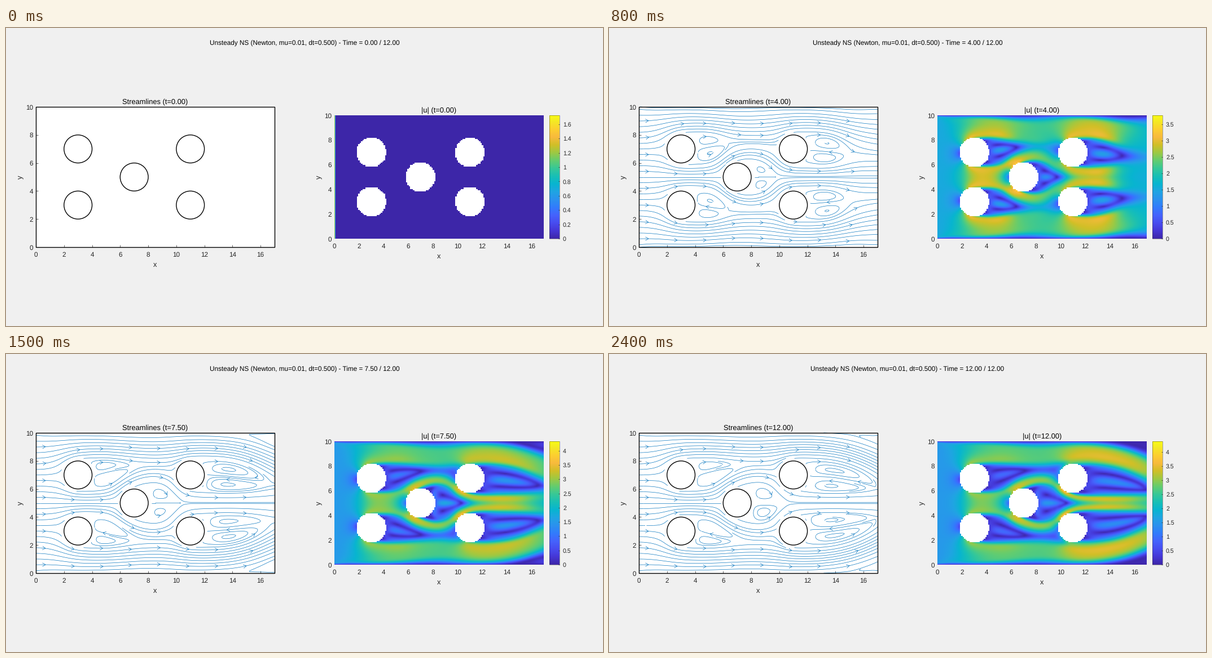
Write a matplotlib script that moves like this. It is 1058 px wide and 529 px high and loops after 2.5 s.

```python
import math
import numpy as np
import matplotlib.pyplot as plt
from matplotlib.animation import FuncAnimation
from matplotlib.collections import LineCollection
from matplotlib.patches import Circle, Rectangle

plt.rcParams["font.family"] = "Liberation Sans"
plt.rcParams["text.hinting"] = "none"

W, H, DPI = 1058, 529, 100
FRAMES, DT, NU, INFLOW = 25, 0.5, 0.01, 1.5
LX, LY = 17.0, 10.0
NX, M = 160, 50                      # solver cells in x and in the lower half of y
DX, DY = LX / NX, LY / (2 * M)
GX, GY = 149, 99                     # cells of the plotted grid
HOLES = [(3, 3), (3, 7), (7, 5), (11, 3), (11, 7)]

PARULA = np.array([
    (.2422, .1504, .6603), (.2706, .2147, .8364), (.2813, .3006, .9414),
    (.2699, .3892, .9906), (.1963, .4847, .9892), (.1687, .5703, .9359),
    (.1248, .6459, .8883), (.0297, .7082, .8163), (.0964, .7500, .7120),
    (.2161, .7843, .5923), (.3909, .8029, .4354), (.6174, .7876, .2612),
    (.8203, .7498, .1535), (.9728, .7298, .2394), (.9892, .8136, .1885),
    (.9597, .9135, .1423), (.9769, .9839, .0805)])
STOPS = np.append(np.arange(0, 61, 4), 63) / 63


def parula(s):
    return np.stack([np.interp(s, STOPS, PARULA[:, k]) for k in range(3)], -1)


# ---- flow solver: implicit Euler, Newton on the stream function ----

def gap(x, y):
    """Distance to the nearest hole centre."""
    x, y = x[:, None], y[None, :]
    return np.min([np.hypot(x - a, y - b) for a, b in HOLES], axis=0)


def drag(x, y):
    return 1000 * np.clip((1 - gap(x, y)) / DY + 0.5, 0, 1) ** 3


xn, yn = np.arange(NX + 1) * DX, np.arange(M + 1) * DY
drag_u = drag(xn[1:], yn[:-1] + DY / 2)
drag_v = drag(xn[:-1] + DX / 2, yn[1:-1])


def faces(psi):
    return np.diff(psi, axis=1) / DY, -np.diff(psi, axis=0) / DX


def force(c, old, sides, speeds, k):
    """Momentum balance without pressure; sides and speeds go E, W, N, S."""
    e, w, n, s = sides
    ue, uw, vn, vs = speeds
    lap = (e - 2 * c + w) / DX ** 2 + (n - 2 * c + s) / DY ** 2
    adv = ((ue * (e - c) + uw * (c - w)) / (2 * DX)
           + (vn * (n - c) + vs * (c - s)) / (2 * DY))
    return (c - old) / DT + adv - NU * lap + k * c


def residual(psi, u0, v0):
    """Curl of the momentum balance at the free nodes."""
    u, v = faces(psi)
    ux = np.concatenate([u, u[-1:]])
    uy = np.concatenate([-u[:, :1], u, u[:, -1:]], axis=1)[1:]
    vx = np.concatenate([-v[:1], v, v[-1:]])
    vc = (vx[1:-1] + vx[2:]) / 2
    uc = (u[:, 1:] + u[:, :-1]) / 2

    c, e, w = u[1:], ux[2:], ux[:-2]
    fu = force(c, u0[1:], (e, w, uy[:, 2:], uy[:, :-2]),
               ((e + c) / 2, (w + c) / 2, vc[:, 1:], vc[:, :-1]), drag_u)
    c, n, s = v[:, 1:-1], v[:, 2:], v[:, :-2]
    fv = force(c, v0[:, 1:-1], (vx[2:, 1:-1], vx[:-2, 1:-1], n, s),
               (uc[1:], uc[:-1], (n + c) / 2, (s + c) / 2), drag_v)
    dv = np.concatenate([np.diff(fv, axis=0) / DX, -2 * fv[-1:] / DX])
    return dv - np.diff(fu, axis=1) / DY


MY = M - 1
NB, B = NX // 2, 2 * MY
blocks = np.zeros((NB, 3, B, B))
I, J = np.meshgrid(np.arange(NX), np.arange(MY), indexing="ij")


def jacobian(psi, u0, v0):
    """Probe the 5x5 stencil; central differences are exact here."""
    for a in range(5):
        for b in range(5):
            e = np.zeros_like(psi)
            e[1:, 1:-1][a::5, b::5] = 1
            d = (residual(psi + e, u0, v0) - residual(psi - e, u0, v0)) / 2
            p = I + (a - I + 2) % 5 - 2
            q = J + (b - J + 2) % 5 - 2
            ok = (p >= 0) & (p < NX) & (q >= 0) & (q < MY)
            i, j, p, q = I[ok], J[ok], p[ok], q[ok]
            blocks[i // 2, p // 2 - i // 2 + 1,
                   i % 2 * MY + j, p % 2 * MY + q] = d[ok]


def solve(rhs):
    """Block tridiagonal elimination."""
    rhs = rhs.reshape(NB, B)
    up, y = [], []
    for k in range(NB):
        low, mid, high = blocks[k]
        r = rhs[k]
        if k:
            mid = mid - low @ up[-1]
            r = r - low @ y[-1]
        sol = np.linalg.solve(mid, np.column_stack([high, r]))
        up.append(sol[:, :-1])
        y.append(sol[:, -1])
    for k in range(NB - 2, -1, -1):
        y[k] = y[k] - up[k] @ y[k + 1]
    return np.array(y).reshape(NX, MY)


def nodal(psi):
    """Velocity at the nodes of the whole channel, mirrored about y = 5."""
    u, v = faces(psi)
    un, vn = np.zeros((2, NX + 1, M + 1))
    un[:, 1:-1] = (u[:, 1:] + u[:, :-1]) / 2
    un[:, -1] = u[:, -1]
    vn[1:-1] = (v[1:] + v[:-1]) / 2
    vn[-1] = v[-1]
    return (np.concatenate([un, un[:, -2::-1]], axis=1),
            np.concatenate([vn, -vn[:, -2::-1]], axis=1))


def simulate():
    psi = np.tile(INFLOW * yn, (NX + 1, 1))
    u0, v0 = (np.zeros_like(f) for f in faces(psi))
    start = np.zeros((2, NX + 1, 2 * M + 1))
    start[0, 0] = INFLOW
    states = [tuple(start)]
    for _ in range(FRAMES - 1):
        for _ in range(4):
            jacobian(psi, u0, v0)
            step = solve(residual(psi, u0, v0))
            psi[1:, 1:-1] -= step
            if np.abs(step).max() < 0.05:
                break
        u0, v0 = faces(psi)
        states.append(nodal(psi))
    return states


def sample(f, a, b):
    """Bilinear values of f on the product grid of indices a and b."""
    i = np.minimum(a.astype(int), f.shape[0] - 2)[:, None]
    j = np.minimum(b.astype(int), f.shape[1] - 2)[None, :]
    p, q = a[:, None] - i, b[None, :] - j
    return ((1 - p) * ((1 - q) * f[i, j] + q * f[i, j + 1])
            + p * ((1 - q) * f[i + 1, j] + q * f[i + 1, j + 1]))


# ---- evenly spaced streamlines with arrow heads ----

CELLS, STEP, ARROW = 25, 0.3, 5.4
LEFT = (53, 140, 423, 249)
RIGHT = (582, 155, 371, 219)


def place(box, x, y):
    return box[0] + box[2] * x / LX, box[1] + box[3] * (1 - y / LY)


def trace(u, v, a, b, sign):
    sx, sy = GX / LX, GY / LY

    def heading(a, b):
        if not (0 <= a <= GX and 0 <= b <= GY):
            return None
        i, j = min(int(a), GX - 1), min(int(b), GY - 1)
        f, g = a - i, b - j
        w0, w1, w2, w3 = (1 - f) * (1 - g), (1 - f) * g, f * (1 - g), f * g
        p, q, r, s = u[i], u[i + 1], v[i], v[i + 1]
        du = (w0 * p[j] + w1 * p[j + 1] + w2 * q[j] + w3 * q[j + 1]) * sx
        dv = (w0 * r[j] + w1 * r[j + 1] + w2 * s[j] + w3 * s[j + 1]) * sy
        n = math.hypot(du, dv)
        if not n > 1e-6:
            return None
        return sign * STEP * du / n, sign * STEP * dv / n

    for _ in range(3000):
        yield a, b
        d = heading(a, b)
        d = d and heading(a + d[0] / 2, b + d[1] / 2)
        if not d:
            return
        a, b = a + d[0], b + d[1]
        if not (0 <= a <= GX and 0 <= b <= GY):
            yield min(max(a, 0), GX), min(max(b, 0), GY)
            return


def cell(p, q, n):
    return min(int(p * n), n - 1), min(int(q * n), n - 1)


def head(tip, back, sign):
    dx, dy = tip[0] - back[0], tip[1] - back[1]
    n = math.hypot(dx, dy) or 1
    dx, dy = sign * ARROW * dx / n, sign * ARROW * dy / n
    x, y = tip[0] - dx, tip[1] - dy
    return [(x - 0.6 * dy, y + 0.6 * dx), tip, (x + 0.6 * dy, y - 0.6 * dx)]


def streamlines(u, v):
    u, v = u.tolist(), v.tolist()
    begun, used, lines = set(), set(), []
    spots = range(1, CELLS, 3)
    wanted = {(c, r) for c in spots for r in spots}
    for c in range(CELLS):
        for r in range(CELLS):
            if (c, r) in begun:
                continue
            begun.add((c, r))
            a, b = (c + 0.5) / CELLS * GX, (r + 0.5) / CELLS * GY
            for sign in (1, -1):
                pts, last = [], None
                for i, j in trace(u, v, a, b, sign):
                    p, q = i / GX, j / GY
                    key = cell(p, q, 4 * CELLS)
                    if last and key in used and key != last:
                        break
                    used.add(key)
                    last = key
                    pts.append(place(LEFT, p * LX, q * LY))
                    spot = cell(p, q, CELLS)
                    begun.add(spot)
                    if len(pts) > 1 and spot in wanted:
                        wanted.discard(spot)
                        lines.append(head(pts[-1], pts[-2], sign))
                if len(pts) > 1:
                    lines.append(pts)
    return lines


# ---- speed map ----

def speed_map(u, v, top):
    a = (np.arange(RIGHT[2]) + 0.5) / RIGHT[2] * GX
    b = (1 - (np.arange(RIGHT[3]) + 0.5) / RIGHT[3]) * GY
    z = sample(np.hypot(u, v), a, b).T
    hole = np.isnan(z)
    img = parula(np.where(hole, 0, z) / top)
    img[hole] = 1
    return img


def limit(t):
    return np.interp(t, [0, 0.5, 1.5, 4, 6, 7.5, 9.5, 12],
                     [1.725, 3.7, 3.71, 3.77, 3.97, 4.33, 4.38, 4.38])


solid = gap(np.linspace(0, LX, GX + 1), np.linspace(0, LY, GY + 1)) < 1.13


def regrid(f):
    g = sample(f, np.linspace(0, NX, GX + 1), np.linspace(0, 2 * M, GY + 1))
    return np.where(solid, np.nan, g)


scenes = []
for k, (u, v) in enumerate(simulate()):
    u, v = regrid(u), regrid(v)
    scenes.append((streamlines(u, v) if k else [],
                   speed_map(u, v, limit(k * DT))))

# ---- figure, laid out in pixels ----

fig = plt.figure(figsize=(W / DPI, H / DPI), dpi=DPI, facecolor="#f0f0f0")
ax = fig.add_axes([0, 0, 1, 1])
ax.axis("off")
PX = 72 / DPI
DARK = "#262626"
SMALL, BIG, TINY = 11.75 * PX, 12.95 * PX, 10.56 * PX


def label(x, y, s, size=SMALL, color=DARK, ha="center", **kw):
    return ax.text(x, y, s, fontsize=size, color=color, ha=ha,
                   va=kw.pop("va", "baseline"), **kw)


def picture(img, x, y, w, h):
    return ax.imshow(img, extent=(x, x + w, y + h, y), aspect="auto",
                     interpolation="nearest", zorder=1)


def axis_labels(box):
    x, y, w, h = box
    for k in range(0, 17, 2):
        label(place(box, k, 0)[0], y + h + 17, str(k))
    for k in range(0, 11, 2):
        label(x - 5, place(box, 0, k)[1] + 4.5, str(k), ha="right")
    label(x + w / 2, y + h + 35, "x", BIG)
    label(x - 27, 265, "y", BIG, va="center", rotation=90)


ax.add_patch(Rectangle(LEFT[:2], *LEFT[2:], fc="white", ec="none", zorder=0))
ticks = []
for k in range(0, 17, 2):
    x, y = place(LEFT, k, 0)
    ticks.append([(x, y), (x, y - 4.2)])
for k in range(0, 11, 2):
    x, y = place(LEFT, 0, k)
    ticks.append([(x, y), (x + 4.2, y)])
ax.add_collection(LineCollection(ticks, colors=DARK, linewidths=0.5, zorder=2))
flow = ax.add_collection(LineCollection([], colors=[(0, .447, .741)],
                                        linewidths=0.48, zorder=3))
ax.add_patch(Rectangle(LEFT[:2], *LEFT[2:], fc="none", ec="black", lw=1,
                       zorder=4))
for cx, cy in HOLES:
    ax.add_patch(Circle(place(LEFT, cx, cy), LEFT[2] / LX, fc="white",
                        ec="black", lw=1, zorder=4))
axis_labels(LEFT)
axis_labels(RIGHT)

field = picture(scenes[0][1], *RIGHT)
BAR = (963, 155, 18, 219)
ramp = parula(np.linspace(1, 0, BAR[3]))[:, None, :]
picture(ramp, *BAR)
ax.add_patch(Rectangle(BAR[:2], *BAR[2:], fc="none", ec=DARK, lw=0.4,
                       alpha=0.7, zorder=4))
bar_ticks = ax.add_collection(LineCollection([], colors=DARK, linewidths=0.5,
                                             zorder=5))
bar_text = [label(987, 0, "", TINY, ha="left") for _ in range(9)]

heading = label(W / 2, 31, "", SMALL, "black")
left_title = label(264.5, 135.5, "", BIG, "black")
right_title = label(767.5, 150.5, "", BIG, "black")
ax.set_xlim(0, W)
ax.set_ylim(H, 0)


def draw(k):
    t = k * DT
    lines, img = scenes[k]
    flow.set_segments(lines)
    field.set_data(img)
    heading.set_text("Unsteady NS (Newton, mu=0.01, dt=0.500) - "
                     f"Time = {t:.2f} / 12.00")
    left_title.set_text(f"Streamlines (t={t:.2f})")
    right_title.set_text(f"|u| (t={t:.2f})")
    top, step = limit(t), 0.5 if k else 0.2
    marks = []
    for n, txt in enumerate(bar_text):
        y = BAR[1] + BAR[3] * (1 - n * step / top)
        shown = n * step <= top
        txt.set_text(f"{n * step:g}" if shown else "")
        txt.set_y(y + 4)
        if shown:
            marks.append([(BAR[0] + BAR[2] - 2.5, y), (BAR[0] + BAR[2], y)])
    bar_ticks.set_segments(marks)
    return ()


anim = FuncAnimation(fig, draw, frames=FRAMES, interval=100, repeat=True,
                     repeat_delay=0, blit=False)
plt.show()
```
